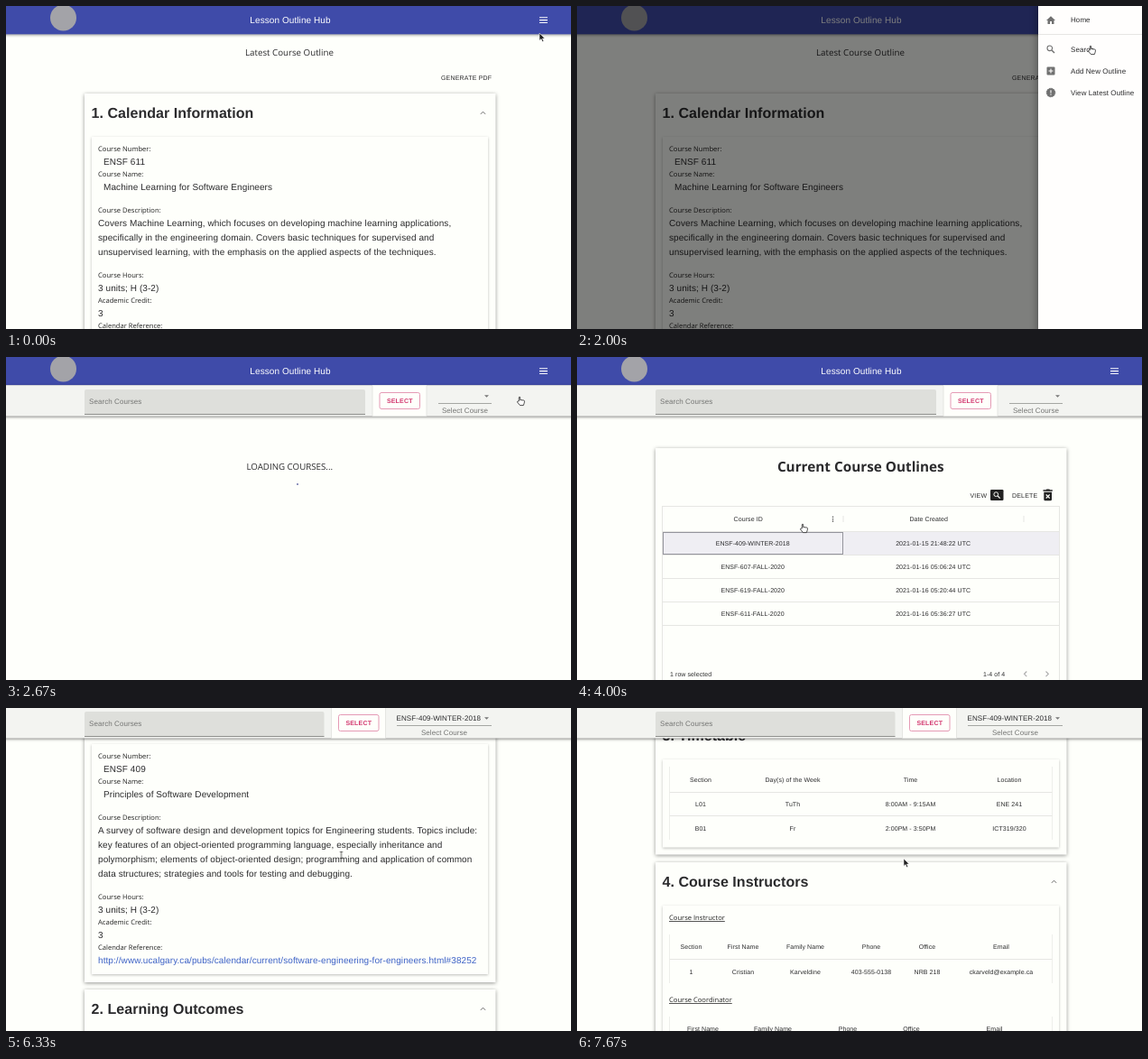
Animation, 626 px wide and 358 px high, one loop 8000 ms. Source, as an HTML page:

```html
<!DOCTYPE html>
<html lang="en">
<head>
<meta charset="utf-8">
<title>Course outlines</title>
<style>
html, body { margin: 0; width: 100%; height: 100%; overflow: hidden; background: #fefffb; }
svg { display: block; width: 626px; height: 358px; }

text { font: 10px "Liberation Sans", Arial, sans-serif; letter-spacing: .08px; fill: #2b2b2d; text-rendering: geometricPrecision; white-space: pre; }
.label { font: 500 7.6px "Open Sans", "Noto Sans", sans-serif; letter-spacing: 0; fill: #222; }
.title { font: 9.74px "Open Sans", "Noto Sans", sans-serif; letter-spacing: 0; }
.big { font: bold 15.3px "Open Sans", "Noto Sans", sans-serif; letter-spacing: 0; }
.head { font-size: 16px; font-weight: bold; letter-spacing: .05px; }
.cell { font-size: 7px; letter-spacing: .075px; }
.btn { font-size: 7px; letter-spacing: .2px; }
.field { font-size: 8px; letter-spacing: .075px; }
.mid { text-anchor: middle; }
.end { text-anchor: end; }
.hint { fill: #747573; }
.pink { fill: #d3376f; font-weight: bold; }
.link { fill: #3d62c6; }
.under { text-decoration: underline; }

.card { fill: #fefffb; filter: drop-shadow(0 1px 2.2px rgba(0, 0, 0, .42)); }
.inner { fill: #fefffb; filter: drop-shadow(0 1px 1.5px rgba(0, 0, 0, .26)); }
.table { fill: #fefffb; filter: drop-shadow(0 .9px .6px rgba(0, 0, 0, .26)); }
.strip { fill: #f3f4f1; filter: drop-shadow(0 1px 1.5px rgba(0, 0, 0, .5)); }
.line { stroke: #e6e6e3; fill: none; }
.icon { fill: none; stroke: #666; }

/* hard cuts on one shared 8 s clock */
.home, .load, .grid, .view, .slim, .wide, .picked, .idle, .shade, .drawer, .hover,
.scroll, .bars, .arrow, .hand, .beam { animation: 8s step-end infinite; }
.home { animation-name: home; }
.load { animation-name: load; }
.grid { animation-name: grid; }
.view, .wide { animation-name: view; }
.slim { animation-name: slim; }
.picked { animation-name: picked; }
.idle { animation-name: idle; }
.shade { animation-name: shade; }
.drawer { animation-name: drawer; }
.hover { animation-name: hover; }
.scroll { animation-name: scroll; }
.bars { animation-name: bars; }
.arrow { animation-name: arrow; }
.hand { animation-name: hand; }
.beam { animation-name: beam; }

@keyframes home { 0% { opacity: 1 } 29.125%, 100% { opacity: 0 } }
@keyframes load { 0% { opacity: 0 } 29.125% { opacity: 1 } 37.5%, 100% { opacity: 0 } }
@keyframes grid { 0% { opacity: 0 } 37.5% { opacity: 1 } 70.875%, 100% { opacity: 0 } }
@keyframes view { 0% { opacity: 0 } 70.875%, 100% { opacity: 1 } }
@keyframes slim { 0% { opacity: 0 } 29.125% { opacity: 1 } 70.875%, 100% { opacity: 0 } }
@keyframes picked { 0% { opacity: 0 } 50%, 100% { opacity: 1 } }
@keyframes idle { 0% { opacity: .3 } 50%, 100% { opacity: 1 } }
@keyframes shade { 0% { opacity: 0 } 8.375% { opacity: .5 } 29.125% { opacity: .26 } 33.375%, 100% { opacity: 0 } }
@keyframes drawer {
  0% { transform: translateX(150px) } 8.375% { transform: none }
  29.125% { transform: translateX(24px) } 33.375%, 100% { transform: translateX(150px) }
}
@keyframes hover { 0% { opacity: 0 } 29.125%, 100% { opacity: 1 } }
@keyframes scroll {
  0% { transform: none }
  75% { transform: translateY(-98px) }
  79.125% { transform: translateY(-112px) }
  83.375% { transform: translateY(-270px) }
  87.5% { transform: translateY(-440px) }
  91.625% { transform: translateY(-620px) }
  95.875%, 100% { transform: translateY(-791px) }
}
@keyframes bars { 0% { transform: none } 75%, 100% { transform: translateY(-32px) } }
@keyframes arrow {
  0% { transform: translate(591px, 30px) }
  4.125% { transform: translate(-50px, 0) }
  8.375% { transform: translate(594px, 17px) }
  12.5% { transform: translate(-50px, 0) }
  54.125% { transform: translate(429px, 151px) }
  58.375% { transform: translate(-50px, 0) }
  70.875% { transform: translate(406px, 170px) }
  75% { transform: translate(372px, 160px) }
  79.125% { transform: translate(-50px, 0) }
  83.375%, 100% { transform: translate(362px, 167px) }
}
@keyframes hand {
  0% { transform: translate(-50px, 0) }
  4.125% { transform: translate(592px, 14px) }
  8.375% { transform: translate(-50px, 0) }
  12.5% { transform: translate(590px, 68px) }
  16.625% { transform: translate(603px, 86px) }
  25% { transform: translate(566px, 44px) }
  37.5% { transform: translate(251px, 182px) }
  41.625% { transform: translate(251px, 186px) }
  50% { transform: translate(247px, 185px) }
  54.125% { transform: translate(-50px, 0) }
  58.375% { transform: translate(443px, 150px) }
  70.875%, 100% { transform: translate(-50px, 0) }
}
@keyframes beam {
  0% { transform: translate(-50px, 0) }
  79.125% { transform: translate(371.5px, 163px) }
  83.375%, 100% { transform: translate(-50px, 0) }
}
</style>
</head>
<body>
<svg viewBox="0 0 626 358">
  <defs>
    <path id="up" class="icon" d="M-2.6 1.3 0-1.3 2.6 1.3"/>
    <path id="down" fill="#777" d="M-2.5-1.2h5L0 1.3z"/>
    <g id="lens" fill="none" stroke-width="1.1"><circle cx="-1.2" cy="-1.2" r="2.8"/><path d="M.9.9 4 4" stroke-width="1.4"/></g>
    <g id="labels">
      <text class="label" x="102" y="161">Course Number:</text>
      <text class="label" x="102" y="189">Course Name:</text>
      <text class="label" x="102" y="229">Course Description:</text>
    </g>
    <g id="hours">
      <text class="label" x="102" y="301">Course Hours:</text>
      <text x="102" y="316">3 units; H (3-2)</text>
      <text class="label" x="102" y="329">Academic Credit:</text>
      <text x="102" y="344">3</text>
      <text class="label" x="102" y="357">Calendar Reference:</text>
    </g>
    <g id="select">
      <rect y="31.5" width="60" height="34" fill="#fefffb"/>
      <path d="M0 32v33.5M60 32v33.5" stroke="#ddddda" stroke-width=".7"/>
      <rect x="8" y="39.5" width="44.5" height="18" rx="2" fill="none" stroke="#e59ab5"/>
      <text class="btn pink mid" x="30.3" y="51">SELECT</text>
    </g>
  </defs>

  <rect width="626" height="358" fill="#fefffb"/>

  <g class="home">
    <text class="title mid" x="314" y="54.5">Latest Course Outline</text>
    <text class="btn end" x="538.3" y="82">GENERATE PDF</text>
    <rect class="card" x="87" y="97" width="455.5" height="400"/>
    <text class="head" x="94.5" y="124">1. Calendar Information</text>
    <use href="#up" x="528.5" y="118.5"/>
    <rect class="inner" x="95" y="145" width="439" height="300"/>
    <use href="#labels"/>
    <text x="108" y="176">ENSF 611</text>
    <text x="108" y="204">Machine Learning for Software Engineers</text>
    <text x="102" y="244">Covers Machine Learning, which focuses on developing machine learning applications,</text>
    <text x="102" y="260">specifically in the engineering domain. Covers basic techniques for supervised and</text>
    <text x="102" y="276">unsupervised learning, with the emphasis on the applied aspects of the techniques.</text>
    <use href="#hours"/>
  </g>

  <g class="load">
    <text class="title mid" x="314.3" y="124.5">LOADING COURSES...</text>
    <circle cx="323" cy="141" r="1" fill="#6b70a8"/>
  </g>

  <g class="grid">
    <rect class="card" x="87" y="101" width="455.5" height="300"/>
    <text class="big mid" x="314.3" y="127">Current Course Outlines</text>
    <g class="idle">
      <text class="btn" x="435.5" y="156">VIEW</text>
      <rect x="458" y="147" width="14.5" height="12" rx="1.3" fill="#222"/>
      <use href="#lens" transform="translate(465.3 153.2) scale(.85)" stroke="#fefffb"/>
      <text class="btn" x="482" y="156">DELETE</text>
      <path d="M516.5 147.3h3l.8-.8h3l.8.8h2.7v1.5h-10.3zM517.3 149.8h8.7v8q0 1.5-1.5 1.5h-5.7q-1.5 0-1.5-1.5z" fill="#222"/>
      <path d="m519.7 152.5 4 4m0-4-4 4" stroke="#fefffb" stroke-width="1.1"/>
    </g>
    <rect class="line" x="94.5" y="165.5" width="440" height="240"/>
    <text class="cell mid" y="182"><tspan x="189.7">Course ID</tspan><tspan x="389.7">Date Created</tspan></text>
    <g fill="#555"><circle cx="283.5" cy="177.3" r=".8"/><circle cx="283.5" cy="179.7" r=".8"/><circle cx="283.5" cy="182.1" r=".8"/></g>
    <path class="line" d="M295 176v7M495 176v7"/>
    <g class="picked">
      <rect x="95" y="193.5" width="439" height="26" fill="#efeef3"/>
      <text class="cell" x="103" y="354">1 row selected</text>
    </g>
    <path class="line" d="M95 193.5h439m-439 26h439m-439 26h439m-439 26h439m-439 26h439"/>
    <rect class="picked" x="95.5" y="194.5" width="199" height="24" fill="none" stroke="#94949c"/>
    <text class="cell mid" y="208.5"><tspan x="194.7">ENSF-409-WINTER-2018</tspan><tspan x="394.7">2021-01-15 21:48:22 UTC</tspan></text>
    <text class="cell mid" y="234.5"><tspan x="194.7">ENSF-607-FALL-2020</tspan><tspan x="394.7">2021-01-16 05:06:24 UTC</tspan></text>
    <text class="cell mid" y="260.5"><tspan x="194.7">ENSF-619-FALL-2020</tspan><tspan x="394.7">2021-01-16 05:20:44 UTC</tspan></text>
    <text class="cell mid" y="286.5"><tspan x="194.7">ENSF-611-FALL-2020</tspan><tspan x="394.7">2021-01-16 05:36:27 UTC</tspan></text>
    <text class="cell" x="450" y="354">1-4 of 4</text>
    <path d="m498.3 348.5-2.8 2.8 2.8 2.8m21.2-5.6 2.8 2.8-2.8 2.8" fill="none" stroke="#aaa" stroke-width="1.1"/>
  </g>

  <g class="view"><g class="scroll">
    <path class="icon" style="stroke:#333" d="M103.5 91H96m3.7-3.7L96 91l3.7 3.7"/>
    <text class="btn end" x="537.5" y="95">GENERATE PDF</text>

    <rect class="card" x="87" y="104" width="455.5" height="312"/>
    <text class="head" x="94.5" y="131">1. Calendar Information</text>
    <use href="#up" x="528.5" y="125.5"/>
    <rect class="inner" x="95" y="152" width="439" height="255"/>
    <use href="#labels" y="7"/>
    <text x="108" y="183">ENSF 409</text>
    <text x="108" y="211">Principles of Software Development</text>
    <text x="102" y="251">A survey of software design and development topics for Engineering students. Topics include:</text>
    <text x="102" y="267">key features of an object-oriented programming language, especially inheritance and</text>
    <text x="102" y="283">polymorphism; elements of object-oriented design; programming and application of common</text>
    <text x="102" y="299">data structures; strategies and tools for testing and debugging.</text>
    <use href="#hours" y="23"/>
    <text class="link" x="102" y="395">http://www.ucalgary.ca/pubs/calendar/current/software-engineering-for-engineers.html#38252</text>

    <rect class="card" x="87" y="424" width="455.5" height="368"/>
    <text class="head" x="94.5" y="451">2. Learning Outcomes</text>
    <use href="#up" x="528.5" y="445.5"/>
    <rect class="inner" x="95" y="472" width="439" height="311"/>
    <text class="label" x="102" y="489">At the end of this course, you will be able to:</text>
    <text x="108" y="506">1. Explain the main ideas of object-oriented design.</text>
    <text x="108" y="522">2. Write programs that use inheritance and polymorphism.</text>
    <text x="108" y="538">3. Choose suitable data structures for common problems.</text>
    <text x="108" y="554">4. Design classes from a written set of requirements.</text>
    <text x="108" y="570">5. Test and debug programs with standard tools.</text>
    <text x="108" y="586">6. Document software clearly for other developers.</text>
    <text class="label under" x="102" y="612">Graduate Attributes</text>
    <rect class="table" x="102.5" y="620" width="424" height="154"/>
    <path class="line" d="M102.5 648.5h424m-424 25h424m-424 25h424m-424 25h424m-424 25h424"/>
    <text class="cell mid" y="637"><tspan x="145">Outcome</tspan><tspan x="295">Graduate Attribute</tspan><tspan x="455">Level</tspan></text>
    <text class="cell mid" y="664"><tspan x="145">1</tspan><tspan x="295">Knowledge base</tspan><tspan x="455">Introduced</tspan></text>
    <text class="cell mid" y="689"><tspan x="145">2</tspan><tspan x="295">Problem analysis</tspan><tspan x="455">Developed</tspan></text>
    <text class="cell mid" y="714"><tspan x="145">3</tspan><tspan x="295">Investigation</tspan><tspan x="455">Developed</tspan></text>
    <text class="cell mid" y="739"><tspan x="145">4</tspan><tspan x="295">Design</tspan><tspan x="455">Applied</tspan></text>
    <text class="cell mid" y="764"><tspan x="145">5</tspan><tspan x="295">Engineering tools</tspan><tspan x="455">Applied</tspan></text>

    <g transform="translate(0 791)">
      <rect class="card" x="87" y="9" width="455.5" height="153.5"/>
      <text class="head" x="94.5" y="36">3. Timetable</text>
      <use href="#up" x="528.5" y="30.5"/>
      <rect class="inner" x="95" y="57" width="439" height="97.5"/>
      <rect class="table" x="102.5" y="65" width="424" height="81"/>
      <path class="line" d="M102.5 93.5h424m-424 26h424"/>
      <text class="cell mid" y="81.5"><tspan x="137">Section</tspan><tspan x="239">Day(s) of the Week</tspan><tspan x="369.5">Time</tspan><tspan x="479">Location</tspan></text>
      <text class="cell mid" y="109"><tspan x="137">L01</tspan><tspan x="239">TuTh</tspan><tspan x="369.5">8:00AM - 9:15AM</tspan><tspan x="479">ENE 241</tspan></text>
      <text class="cell mid" y="135.5"><tspan x="137">B01</tspan><tspan x="239">Fr</tspan><tspan x="369.5">2:00PM - 3:50PM</tspan><tspan x="479">ICT319/320</tspan></text>

      <rect class="card" x="87" y="171" width="455.5" height="300"/>
      <text class="head" x="94.5" y="198">4. Course Instructors</text>
      <use href="#up" x="528.5" y="192.5"/>
      <rect class="inner" x="95" y="219" width="439" height="240"/>
      <text class="label under" x="102" y="235">Course Instructor</text>
      <rect class="table" x="102.5" y="251" width="424" height="54"/>
      <path class="line" d="M102.5 278.5h424"/>
      <text class="cell mid" y="267"><tspan x="126.5">Section</tspan><tspan x="184">First Name</tspan><tspan x="253">Family Name</tspan><tspan x="326">Phone</tspan><tspan x="388">Office</tspan><tspan x="470">Email</tspan></text>
      <text class="cell mid" y="294.5"><tspan x="126.5">1</tspan><tspan x="184">Cristian</tspan><tspan x="253">Karveldine</tspan><tspan x="326">403-555-0138</tspan><tspan x="388">NRB 218</tspan><tspan x="470">ckarveld@example.ca</tspan></text>
      <text class="label under" x="102" y="326">Course Coordinator</text>
      <rect class="table" x="102.5" y="342" width="424" height="54"/>
      <text class="cell mid" y="358"><tspan x="139.5">First Name</tspan><tspan x="217">Family Name</tspan><tspan x="300">Phone</tspan><tspan x="370.5">Office</tspan><tspan x="462.5">Email</tspan></text>
    </g>
  </g></g>

  <g class="bars">
    <rect x="-5" y="-5" width="636" height="36.3" fill="#3f4ba9" style="filter:drop-shadow(0 1px 1.5px rgba(0,0,0,.4))"/>
    <circle cx="63.5" cy="13" r="14.5" fill="#a3a3a8"/>
    <text class="mid" x="315" y="19" style="fill:#fff">Lesson Outline Hub</text>
    <path d="M591 12.7h9m-9 2.9h9m-9 2.9h9" stroke="#fff" stroke-width="1.1"/>
    <g class="slim">
      <rect class="strip" x="-5" y="31.3" width="636" height="34.2"/>
      <path d="M87 63.5V38q0-2 2-2h307q2 0 2 2v25.5z" fill="#dedfdb"/>
      <path d="M87 63.5h311" stroke="#8d8e8b"/>
      <text class="field hint" x="92" y="52">Search Courses</text>
      <use href="#select" x="406"/>
      <path d="M479 51.5h59" stroke="#929390" stroke-width=".8"/>
      <use href="#down" x="532.5" y="43.5"/>
      <text class="field hint mid" x="508.5" y="62">Select Course</text>
    </g>
    <g class="wide">
      <rect class="strip" x="-5" y="31.3" width="636" height="34.2"/>
      <path d="M87 63.5V38q0-2 2-2h261.500q2 0 2 2v25.500z" fill="#dedfdb"/>
      <path d="M87 63.5h265.5" stroke="#8d8e8b"/>
      <text class="field hint" x="92" y="52">Search Courses</text>
      <use href="#select" x="360.5"/>
      <text class="field" x="432.5" y="46">ENSF-409-WINTER-2018</text>
      <path d="M433 51.5h105" stroke="#929390" stroke-width=".8"/>
      <use href="#down" x="532.5" y="43.5"/>
      <text class="field hint mid" x="485.5" y="62">Select Course</text>
    </g>
  </g>

  <rect class="shade" width="626" height="358"/>

  <g class="drawer">
    <rect x="511" y="-5" width="140" height="368" fill="#fffefd" style="filter:drop-shadow(0 2px 5px rgba(0,0,0,.45))"/>
    <rect class="hover" x="511" y="36" width="140" height="24" fill="#c3c2c2"/>
    <path class="line" d="M511 31.5h140"/>
    <g fill="#707070">
      <path d="M524 20v-3h2v3h2.500v-4h1.500l-5-4.700-5 4.700h1.500v4z"/>
      <use href="#lens" x="525" y="48" stroke="#707070"/>
      <rect x="520.5" y="67.5" width="9" height="9" rx="1"/>
      <circle cx="525" cy="96" r="4.8"/>
      <circle cx="525" cy="96" r="4.8" fill="none" stroke="#707070" stroke-dasharray="1.5 1"/>
    </g>
    <path d="M522.5 72h5m-2.5-2.5v5M525 93.3v3.2m0 1v1.2" stroke="#fffefd" stroke-width="1.1"/>
    <text class="field" x="547" y="18">Home</text>
    <text class="field" x="547" y="50.5">Search</text>
    <text class="field" x="547" y="74.5">Add New Outline</text>
    <text class="field" x="547" y="98.5">View Latest Outline</text>
  </g>

  <path class="arrow" d="M0 0v8.2l2-1.7 1.3 3 1.4-.6-1.3-2.9h2.6z" fill="#222" stroke="#fff" stroke-width=".5"/>
  <path class="hand" d="M2.3 5V1q0-.8.7-.8t.7.8v2.5l4 .6q.9.200.8 1.200l-.5 2.400-.7 1.900H3.500L.6 6.100q-.3-.900.500-1.100z" fill="#fff" stroke="#222" stroke-width=".8"/>
  <path class="beam" d="M-1.5-3.5h3M0-3.500v7m-1.500 0h3" fill="none" stroke="#333" stroke-width=".8"/>
</svg>
</body>
</html>
```
